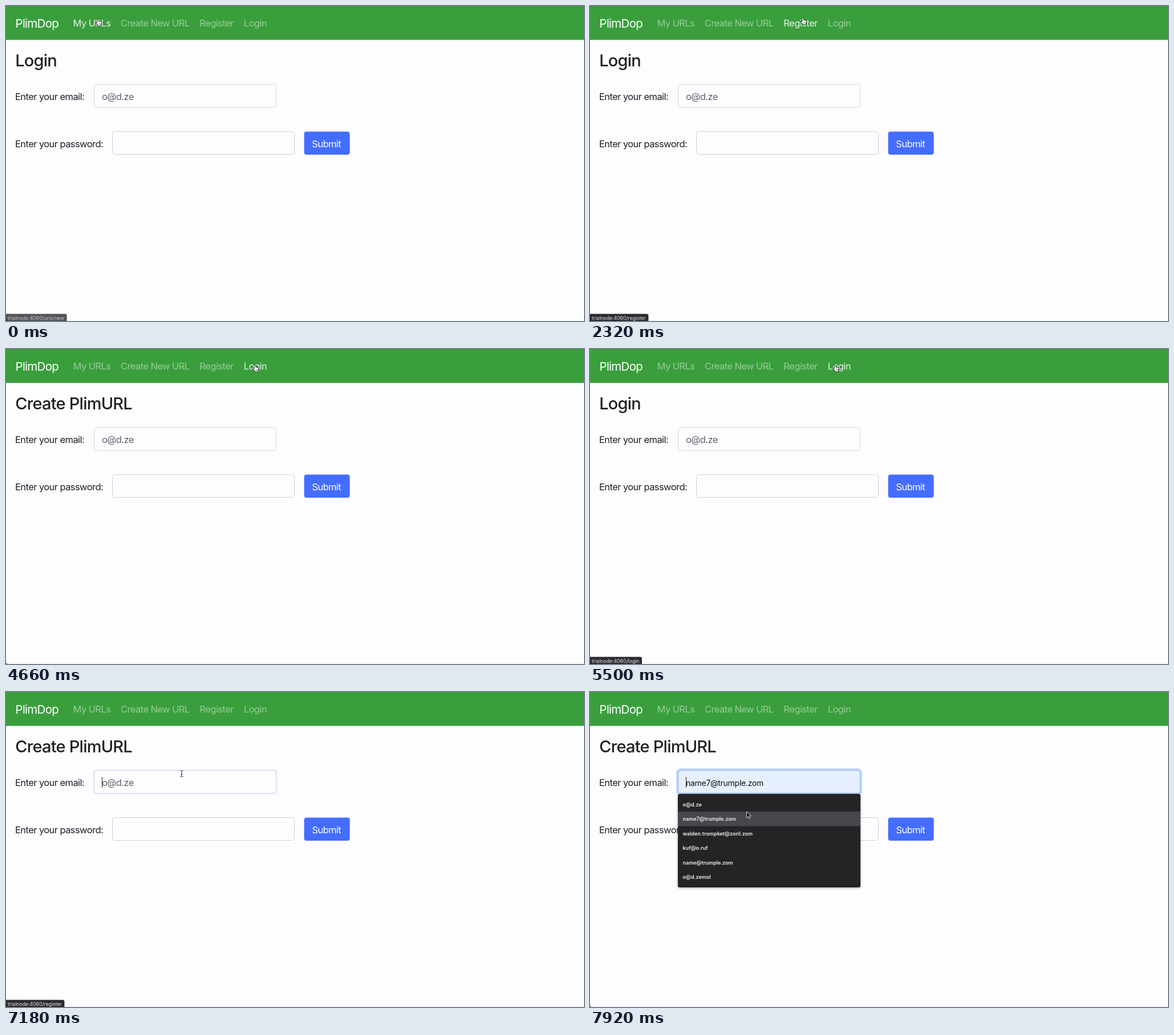
An HTML page with a canvas that plays this animation: 1013x553 px, repeating every 8000 ms.

```html
<!DOCTYPE html>
<html lang="en">
<head>
<meta charset="utf-8">
<title>Login demo</title>
<style>
  html, body { margin: 0; width: 100%; height: 100%; overflow: hidden; background: #fdfdff; }
  canvas { display: block; width: 1013px; height: 553px; }
</style>
</head>
<body>
<canvas id="stage"></canvas>
<script>
const W = 1013, H = 553, LOOP = 8000;
const FONT = 'Inter, "Open Sans", sans-serif';
const canvas = document.getElementById('stage');
const ctx = canvas.getContext('2d');
const ratio = window.devicePixelRatio || 1;
canvas.width = W * ratio;
canvas.height = H * ratio;

const HOST = 'trialnode:4060/';
const HINT = 'o@d.ze';
const EMAILS = [HINT, 'name7@trumple.zom', 'walden.trompket@zoril.zom',
  'kuf@o.ruf', 'name@trumple.zom', 'o@d.zemol'];

// label, text x, left and right edge of the hit area
const LINKS = [
  ['My URLs', 117.5, 109, 193],
  ['Create New URL', 201, 193, 331],
  ['Register', 339.3, 331, 408],
  ['Login', 416.7, 408, 466]
];

// time, x, y of the pointer's middle
const PATH = [
  [0, 163, 29], [400, 163, 29], [700, 220, 32], [1000, 290, 33], [1200, 375, 29],
  [1600, 375, 24], [2040, 375, 27], [2700, 375, 27], [3180, 372, 32], [3280, 350, 55],
  [3500, 292, 164], [3820, 290, 165], [4200, 330, 130], [4560, 438, 34], [5400, 438, 34],
  [5600, 425, 34], [5750, 365, 36], [5950, 360, 38], [6060, 351, 54], [6240, 350, 52],
  [6900, 350, 50], [7140, 308, 143], [7420, 306, 148], [7750, 278, 200], [7920, 278, 216]
];

// path, shown from, starts fading, fade length
const HINTS = [
  ['urls/new', 0, -40, 200],
  ['urls', 80, 760, 1],
  ['urls/new', 760, 1280, 1],
  ['register', 1280, 3450, 200],
  ['login', 4760, 5750, 1],
  ['register', 5750, 7240, 200]
];

const MENU_AT = 7380, FOCUS_AT = 7165;
const clamp = v => Math.max(0, Math.min(1, v));

function snap(t) {
  if (t < 460) return t > 260 && t < 400 ? 260 : Math.floor(t / 40) * 40;
  const local = (t - 460) % 840, step = 740 / 17;
  return t - local + Math.floor((Math.min(local, 740) + 0.01) / step) * step;
}

function pointerAt(t) {
  const i = PATH.findIndex(p => p[0] > t);
  if (i < 0) return PATH[PATH.length - 1].slice(1);
  if (i === 0) return PATH[0].slice(1);
  const [t0, x0, y0] = PATH[i - 1], [t1, x1, y1] = PATH[i];
  const u = (t - t0) / (t1 - t0), k = u * u * (3 - 2 * u);
  return [x0 + (x1 - x0) * k, y0 + (y1 - y0) * k];
}

function linkAt([x, y]) {
  return y < 56 ? LINKS.findIndex(l => x >= l[2] && x < l[3]) : -1;
}

function text(str, x, y, size, color, weight = 400, track = -0.035) {
  ctx.font = `${weight} ${size}px ${FONT}`;
  ctx.letterSpacing = `${size * track}px`;
  ctx.fillStyle = color;
  ctx.fillText(str, x, y);
}

function box(x, y, w, h, r, fill, stroke, line = 1) {
  ctx.beginPath();
  ctx.roundRect(x, y, w, h, r);
  if (fill) { ctx.fillStyle = fill; ctx.fill(); }
  if (stroke) { ctx.strokeStyle = stroke; ctx.lineWidth = line; ctx.stroke(); }
}

function drawNav(hover) {
  ctx.fillStyle = '#3a9e3d';
  ctx.fillRect(0, 0, W, 59.5);
  text('PlimDop', 16.5, 38, 20.5, '#fff');
  LINKS.forEach(([label, x], i) =>
    text(label, x, 36, 16.5, `rgba(255,255,255,${i === hover ? 0.88 : 0.48})`));
}

function drawForm(t) {
  const login = t < 2640 || (t >= 5100 && t < 5860);
  text(login ? 'Login' : 'Create PlimURL', 16.2, 105.5, 29, '#202124', 500, -0.027);
  text('Enter your email:', 16, 164.5, 16.5, '#1d2025');
  text('Enter your password:', 16, 247.5, 16.5, '#1d2025');
  box(186.5, 220.5, 319, 40, 4, '#fdfdff', '#cbd0d8');
  box(522.5, 220.5, 80, 40.5, 4, '#446dff');
  text('Submit', 536.2, 247.5, 16.5, '#fff');
}

function drawEmail(t, row) {
  const focus = clamp((t - FOCUS_AT) / 200);
  if (focus) box(154.5, 137.5, 319, 40.5, 4, null, `rgba(70,130,255,${0.3 * focus})`, 7);
  box(154.5, 137.5, 319, 40.5, 4, row < 0 ? '#fdfdff' : '#e6effe', '#d3d7dd');
  if (focus) box(154.5, 137.5, 319, 40.5, 4, null, `rgba(125,170,245,${0.2 + 0.8 * focus})`);
  if (row < 0) text(HINT, 168, 164.5, 16.5, '#5f636b');
  else text(EMAILS[row], 168, 164.5, 14, '#111', 400, -0.02);
  if (t >= FOCUS_AT && (t - FOCUS_AT) % 1000 < 500 || row > 0) {
    ctx.fillStyle = '#222';
    ctx.fillRect(168, 149, 1, 19);
  }
}

function drawMenu(row) {
  ctx.save();
  ctx.shadowColor = 'rgba(0,0,0,.35)';
  ctx.shadowBlur = 4 * ratio;
  ctx.shadowOffsetY = ratio;
  box(154, 179, 320, 164, 3, '#242427');
  ctx.restore();
  if (row >= 0) {
    ctx.fillStyle = '#47474b';
    ctx.fillRect(154, 184.5 + row * 25.5, 320, 25.5);
  }
  EMAILS.forEach((mail, i) => text(mail, 162.5, 200.5 + i * 25.5, 9, '#f1f1f3', 600, 0));
}

function drawStatus(t) {
  for (const [path, from, fade, length] of HINTS) {
    const alpha = t < from ? 0 : 1 - clamp((t - fade) / length);
    if (!alpha) continue;
    ctx.save();
    ctx.globalAlpha = alpha;
    ctx.font = `400 8.7px ${FONT}`;
    ctx.letterSpacing = '0px';
    const w = ctx.measureText(HOST + path).width + 7.5;
    box(-2, 540.5, w + 2, 16, 3, '#2a2a2e');
    text(HOST + path, 3, 550.8, 8.7, '#e9e9ec', 400, 0);
    ctx.restore();
  }
}

function shape(d, fill, stroke, line) {
  const p = new Path2D(d);
  ctx.lineWidth = line;
  ctx.lineJoin = 'round';
  ctx.strokeStyle = stroke;
  ctx.stroke(p);
  ctx.fillStyle = fill;
  ctx.fill(p);
}

function drawPointer([x, y], kind) {
  ctx.save();
  ctx.translate(x, y);
  if (kind === 'hand') {
    shape('M-3.2-4.6Q-3.2-5.7-2.2-5.7T-1.1-4.6L-.5-1.6Q.4-2.4 1.2-1.5Q2-2 2.8-1.1Q4.3-1.3 4.3.3' +
      'Q4.4 2.5 3.2 4.1V5.5H-1.6Q-2.2 4-4.5 1.6Q-5.2.4-4.1.1Q-3.2 0-2.3 1Z', '#fff', '#151515', 1.7);
    ctx.strokeStyle = '#333';
    ctx.lineWidth = 0.6;
    ctx.stroke(new Path2D('M-.3 1.4V3.6M1.1 1.4V3.6M2.5 1.4V3.6'));
  } else if (kind === 'beam') {
    const d = new Path2D('M-2.6-5.5Q-.4-5.5 0-4.5Q.4-5.5 2.6-5.5M0-4.5V4.5' +
      'M-2.6 5.5Q-.4 5.5 0 4.5Q.4 5.5 2.6 5.5M-1.3 1.5H1.3');
    ctx.strokeStyle = '#fff';
    ctx.lineWidth = 2;
    ctx.stroke(d);
    ctx.strokeStyle = '#222';
    ctx.lineWidth = 1;
    ctx.stroke(d);
  } else {
    shape('M-3-5.5V4L-.9 2.1L.6 5.5L2.1 4.8L.7 1.6H3.6Z', '#111', '#fff', 1.5);
  }
  ctx.restore();
}

function draw(t) {
  const pos = pointerAt(t), [x, y] = pos;
  const menu = t >= MENU_AT;
  const row = menu && y > 189.5 ? Math.floor((y - 189.5) / 25.5) : -1;
  const inField = x > 154 && x < 474 && y > 137 && y < 178;
  const kind = linkAt(pos) >= 0 ? 'hand' : inField ? 'beam' : 'arrow';

  ctx.setTransform(ratio, 0, 0, ratio, 0, 0);
  ctx.fillStyle = '#fdfdff';
  ctx.fillRect(0, 0, W, H);
  ctx.fillStyle = '#f1f1f6';
  ctx.fillRect(0, 552, W, 1);
  drawNav(linkAt(pointerAt(Math.max(0, t - 100))));
  drawForm(t);
  drawEmail(t, row);
  if (menu) drawMenu(row);
  drawStatus(t);
  ctx.fillStyle = '#222';
  ctx.fillRect(0, 551.5, 1.5, 1.5);
  drawPointer(pos, kind);
}

function tick() {
  draw(snap(performance.now() % LOOP));
  requestAnimationFrame(tick);
}
tick();
</script>
</body>
</html>
```
